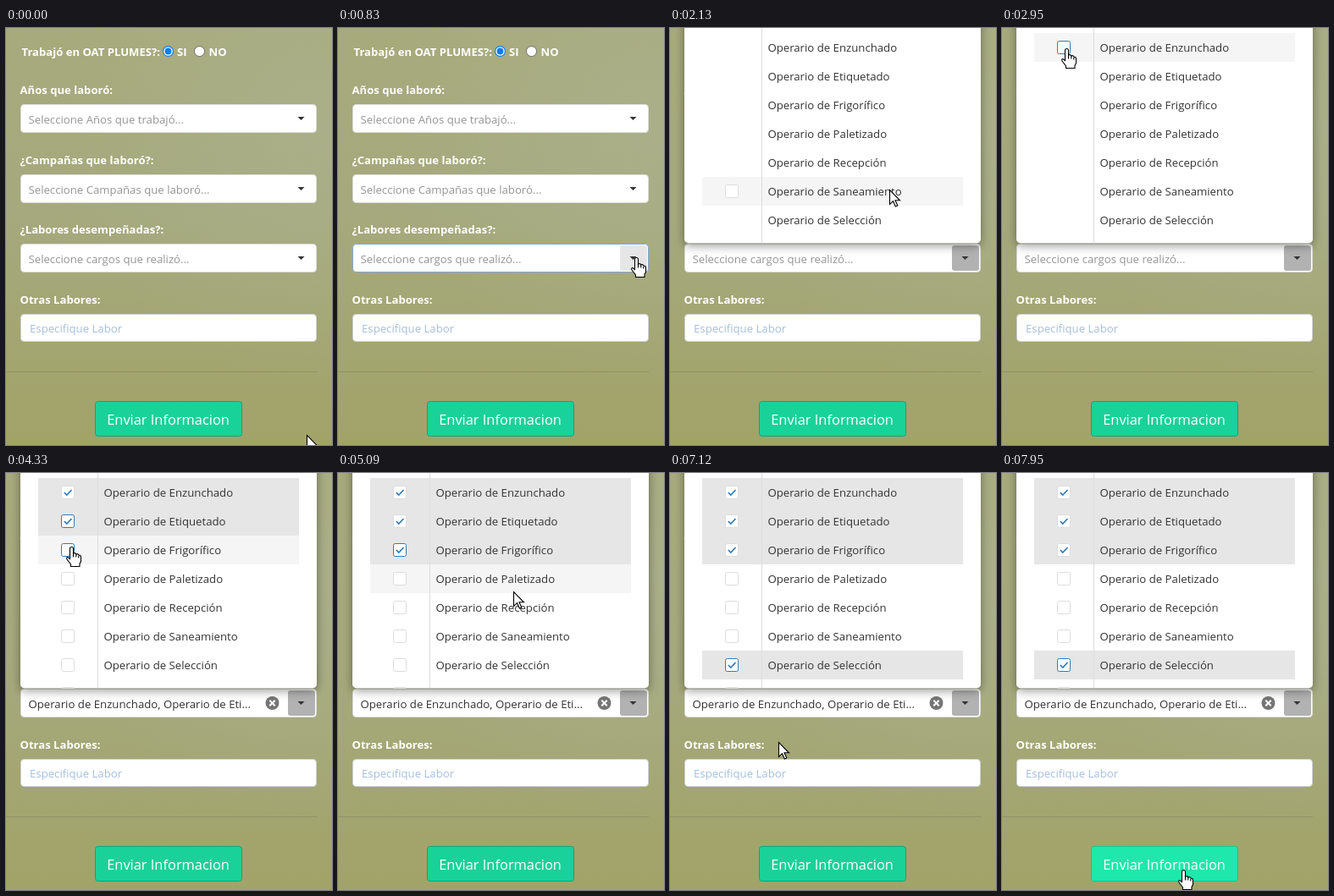
An HTML page with a canvas that plays this animation: 385 by 493 pixels, repeating every 8000 ms.

```html
<!DOCTYPE html>
<html lang="es">
<head>
<meta charset="utf-8">
<style>
html, body { margin: 0; width: 100%; height: 100%; overflow: hidden; }
canvas { display: block; }
</style>
</head>
<body>
<canvas width="385" height="493"></canvas>
<script>
const ctx = document.querySelector('canvas').getContext('2d');
const LOOP = 8000, OPEN = 960, LOADED = 1300, BLUE = '#337ab7';
const tasks = ['Enzunchado', 'Etiquetado', 'Frigorífico', 'Paletizado', 'Recepción', 'Saneamiento', 'Selección', 'Lavado'];
const clicks = [[0, 3100], [1, 3960], [2, 4600], [6, 6780]]; // row, time

// Pointer stops: time, x, y and an optional control point for the way there
const stops = [
  [0, 355, 481], [830, 352, 271, 378, 390], [1150, 352, 271], [1440, 345, 275], [1800, 345, 275],
  [2610, 110, 44], [2930, 76, 24], [3200, 76, 24], [3430, 76, 52], [3840, 76, 64], [4130, 76, 64],
  [4330, 77, 87], [4660, 77, 87], [4800, 76, 123], [4940, 90, 120], [5160, 243, 146], [5850, 243, 146],
  [6230, 155, 247], [6640, 74, 226], [6860, 74, 226], [7480, 216, 467], [7610, 216, 469],
  [7760, 216, 469], [7940, 214, 469], [LOOP, 214, 469]
];
const arrow = new Path2D('M0 0V17L4 13.2L6.8 19.5L9.3 18.4L6.5 12.3H12Z');
const hand = new Path2D('M-2 2Q-2 0 0 0Q2 0 2 2V7.5Q4.5 6.5 5.5 8.5Q7.5 7.5 8.5 9.5Q11 9.5 11 12V17L9.5 20V23H-1V20.5L-5.5 14.5Q-6.5 12 -4.5 12L-2 14Z');
const knuckles = new Path2D('M2 7V12M5.3 8.5V12M8.3 10V13');

function pointerAt(t) {
  const i = stops.findIndex(s => s[0] > t);
  const [t0, x0, y0] = stops[i - 1];
  const [t1, x1, y1, cx = (x0 + x1) / 2, cy = (y0 + y1) / 2] = stops[i];
  const p = (t - t0) / (t1 - t0), u = p * p * (3 - 2 * p), v = 1 - u;
  return { x: v * v * x0 + 2 * u * v * cx + u * u * x1, y: v * v * y0 + 2 * u * v * cy + u * u * y1 };
}

const inside = (p, x, y, w, h) => p.x >= x && p.x <= x + w && p.y >= y && p.y <= y + h;

function text(str, x, y, color, size = 13.2, weight = 400) {
  ctx.font = `${weight} ${size}px "Open Sans", "Noto Sans", sans-serif`;
  ctx.fillStyle = color;
  ctx.fillText(str, x, y);
}

const label = (str, x, y) => text(str, x, y, '#fff', 13.1, 700);

function box(x, y, w, h, r, fill, stroke) {
  ctx.beginPath();
  ctx.roundRect(x, y, w, h, r);
  if (fill) { ctx.fillStyle = fill; ctx.fill(); }
  if (stroke) { ctx.strokeStyle = stroke; ctx.lineWidth = 1; ctx.stroke(); }
}

function circle(x, y, r, fill) {
  ctx.beginPath();
  ctx.arc(x, y, r, 0, 7);
  ctx.fillStyle = fill;
  ctx.fill();
}

function line(color, width, ...points) {
  ctx.beginPath();
  points.forEach(([x, y]) => ctx.lineTo(x, y));
  ctx.strokeStyle = color;
  ctx.lineWidth = width;
  ctx.stroke();
}

function select(y, str, color = '#959595', border = '#ddd', button) {
  box(17.5, y + .5, 349, 33, 4, '#fff', border);
  if (button) box(333, y + 2, 32, 30, 3, button);
  text(str, 26.5, y + 22.5, color);
  ctx.beginPath();
  ctx.moveTo(344.5, y + 15);
  ctx.lineTo(352.5, y + 15);
  ctx.lineTo(348.5, y + 19);
  ctx.fillStyle = '#333';
  ctx.fill();
}

function background() {
  const base = ctx.createLinearGradient(0, 0, 0, 493);
  base.addColorStop(0, '#a7aa7b');
  base.addColorStop(.45, '#a5a97d');
  base.addColorStop(1, '#a2a368');
  ctx.fillStyle = base;
  ctx.fillRect(0, 0, 385, 493);
  const glow = ctx.createRadialGradient(370, 120, 0, 370, 120, 300);
  glow.addColorStop(0, 'rgba(174,181,150,.5)');
  glow.addColorStop(1, 'rgba(174,181,150,0)');
  ctx.fillStyle = glow;
  ctx.fillRect(0, 0, 385, 493);
}

function form(t, picked, mouse) {
  background();
  label('Trabajó en OAT PLUMES?:', 18.5, 33);
  circle(191.5, 27.5, 6.5, '#0a7cf0');
  circle(191.5, 27.5, 5.3, '#fff');
  circle(191.5, 27.5, 3.9, '#0a7cf0');
  label('SI', 202, 33);
  circle(228.5, 27.5, 6.5, '#767676');
  circle(228.5, 27.5, 5.5, '#fff');
  label('NO', 239.5, 33);

  label('Años que laboró:', 16.5, 78);
  select(90, 'Seleccione Años que trabajó...');
  label('¿Campañas que laboró?:', 16.5, 161);
  select(173, 'Seleccione Campañas que laboró...');
  label('¿Labores desempeñadas?:', 16.5, 243);

  const over = inside(mouse, 333, 257, 32, 30);
  const button = t < OPEN ? over && '#e6e6e6' : over ? '#d4d4d4' : '#b2b2b2';
  const border = t > 600 && t < 1900 ? '#80a9d6' : '#ddd';
  const chosen = ['Seleccione cargos que realizó...', 'Operario de Enzunchado'][picked.length]
    || 'Operario de Enzunchado, Operario de Eti...';
  select(255, chosen, picked.length ? '#333' : '#959595', border, button);
  if (picked.length) {
    circle(314.5, 272, 8, '#757575');
    line('#fff', 2, [311.3, 268.8], [317.7, 275.2]);
    line('#fff', 2, [317.7, 268.8], [311.3, 275.2]);
  }

  label('Otras Labores:', 16.5, 326);
  box(17.5, 338.5, 349, 32, 4, '#fff', '#ced4da');
  text('Especifique Labor', 28, 360, '#a4bfdd');
  line('#929164', 1, [0, 406.5], [367, 406.5]);
  const hot = inside(mouse, 105, 441, 174, 42);
  box(105.5, 441.5, 173, 41, 3, hot ? '#1ee8ac' : '#18d299', hot ? '#18c390' : '#12a277');
  text('Enviar Informacion', 119.2, 469, '#fff', 16.4);
}

function popup(t, picked, mouse) {
  ctx.save();
  ctx.globalAlpha = Math.min(1, (t - OPEN) / 180);
  ctx.shadowColor = 'rgba(0,0,0,.4)';
  ctx.shadowBlur = 12;
  ctx.shadowOffsetY = 3;
  box(17, -20, 350, 274.5, 5, '#fff');
  ctx.shadowColor = 'transparent';
  ctx.clip();
  if (t > LOADED) {
    tasks.forEach((task, i) => row(task, i, picked, mouse));
    line('#ddd', 1, [108.5, 0], [108.5, 255]);
  }
  ctx.restore();
}

function row(task, i, picked, mouse) {
  const top = 6 + i * 34;
  const hovered = mouse.y < 255 && inside(mouse, 38, top, 308, 33.9);
  const checked = picked.includes(i);
  if (checked || hovered) {
    ctx.fillStyle = checked ? '#e6e6e6' : '#f5f5f5';
    ctx.fillRect(38, top, 308, 34);
  }
  if (picked.length || hovered) {
    const active = picked.at(-1) === i || overCheck(mouse, i);
    box(65.5, top + 9.5, 15, 15, 2, '#fff', active ? BLUE : '#ddd');
  }
  if (checked) line(BLUE, 1.7, [68.8, top + 17], [71.8, top + 20], [77.5, top + 14]);
  text('Operario de ' + task, 115.4, top + 22, '#333');
}

const overCheck = (mouse, i) => inside(mouse, 65, 15 + i * 34, 16, 16);

function pointer(t, mouse) {
  const link = inside(mouse, 333, 257, 32, 30) || inside(mouse, 105, 441, 174, 42)
    || t > LOADED && mouse.y < 255 && tasks.some((_, i) => overCheck(mouse, i));
  ctx.save();
  ctx.translate(Math.round(mouse.x) + .5, Math.round(mouse.y) + .5);
  ctx.fillStyle = '#fff';
  ctx.strokeStyle = '#000';
  ctx.lineWidth = 1.1;
  const shape = link ? hand : arrow;
  ctx.fill(shape);
  ctx.stroke(shape);
  if (link) ctx.stroke(knuckles);
  ctx.restore();
}

function draw() {
  const t = performance.now() % LOOP;
  const mouse = pointerAt(t);
  const picked = clicks.filter(c => t >= c[1]).map(c => c[0]);
  form(t, picked, mouse);
  if (t >= OPEN) popup(t, picked, mouse);
  pointer(t, mouse);
  requestAnimationFrame(draw);
}
draw();
</script>
</body>
</html>
```
